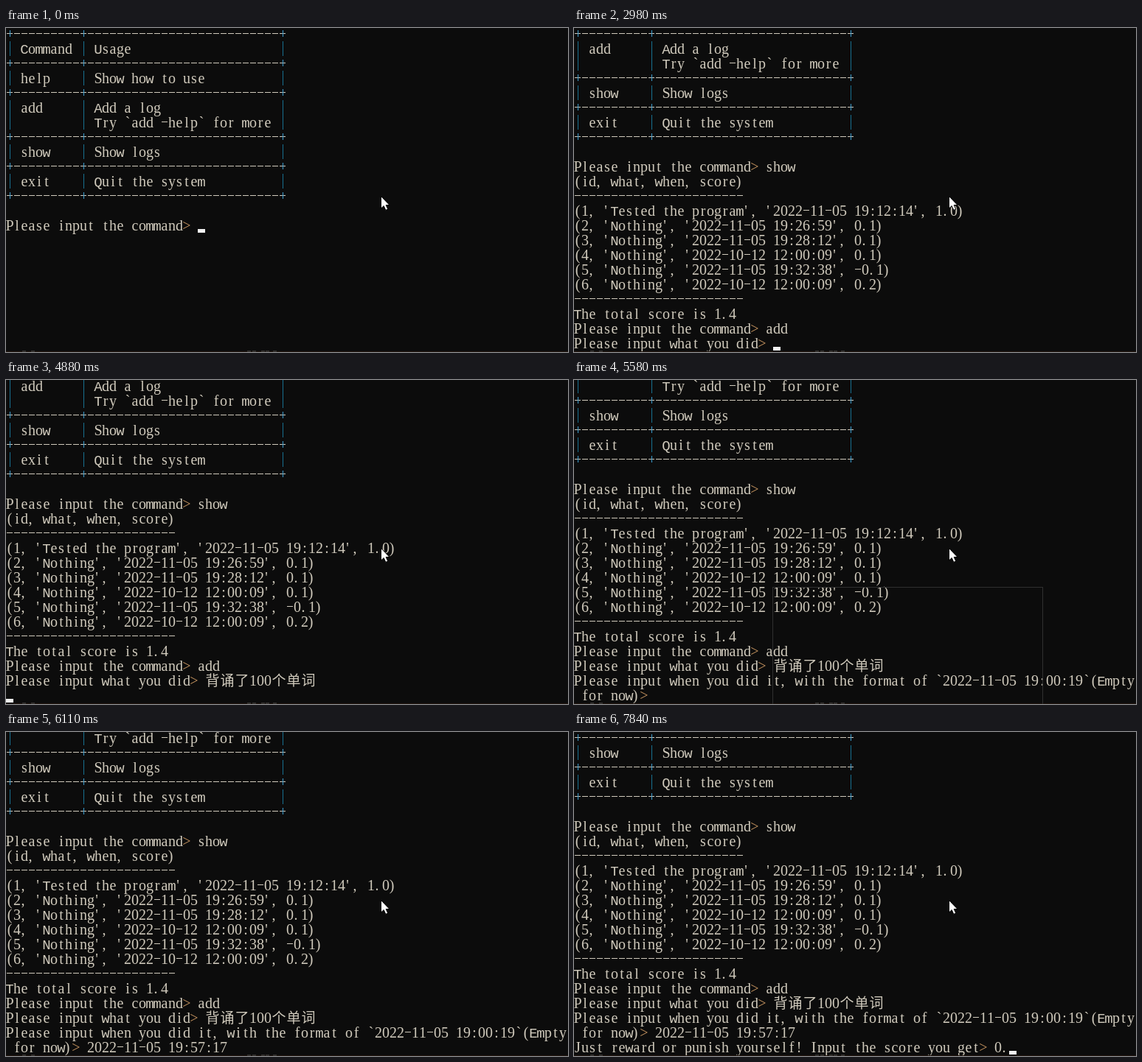
Animation of 762 by 440 pixels, one loop 8000 ms. Source, as an HTML page with a canvas:

```html
<!DOCTYPE html>
<html lang="en">
<head>
<meta charset="utf-8">
<title>Terminal log</title>
<style>
html, body { margin: 0; width: 100%; height: 100%; overflow: hidden; background: #0c0c0c; }
canvas { display: block; }
</style>
</head>
<body>
<canvas id="stage" width="762" height="440"></canvas>
<script>
const ctx = document.getElementById('stage').getContext('2d');
const LOOP = 8000, CELL = 10, ROW = 20, ROWS = 22, TOP = -2;
const INK = '#d0cabc', EDGE = '#17708f', BACK = '#0c0c0c';
const SERIF = '20px "Liberation Serif", serif';
const MONO = '19px "Liberation Mono", monospace';
const CJK = '300 19px "Noto Sans CJK SC", "Noto Sans CJK", sans-serif';

const border = '+' + '-'.repeat(9) + '+' + '-'.repeat(26) + '+\n';
const row = (name, use) => `| ${name.padEnd(8)}| ${use.padEnd(25)}|\n`;
const rule = '-'.repeat(23);
const prompt = 'Please input the command> ';

const banner = border + [
  row('Command', 'Usage'),
  row('help', 'Show how to use'),
  row('add', 'Add a log') + row('', 'Try `add -help` for more'),
  row('show', 'Show logs'),
  row('exit', 'Quit the system')
].join(border) + border + '\n' + prompt;

const listing = `
(id, what, when, score)
${rule}
(1, 'Tested the program', '2022-11-05 19:12:14', 1.0)
(2, 'Nothing', '2022-11-05 19:26:59', 0.1)
(3, 'Nothing', '2022-11-05 19:28:12', 0.1)
(4, 'Nothing', '2022-10-12 12:00:09', 0.1)
(5, 'Nothing', '2022-11-05 19:32:38', -0.1)
(6, 'Nothing', '2022-10-12 12:00:09', 0.2)
${rule}
The total score is 1.4
${prompt}`;

// [time, appended text, caret visible]
const steps = [
  [0, banner, 1],
  [280, 's', 1], [400, '', 0], [550, 'h', 1], [670, 'o', 1], [820, 'w', 1], [970, '', 0],
  [1250, listing, 1], [1970, '', 0],
  [2280, 'a', 1], [2550, 'd', 1], [2670, 'd', 1],
  [2980, '\nPlease input what you did> ', 1], [3510, '', 0], [4040, '', 1],
  [4570, '背诵了100个单词', 0],
  [4880, '\n', 1],
  [5030, 'Please input when you did it, with the format of `2022-11-05 19:00:19`(Empty\n for now)> ', 1],
  [5580, '', 0],
  [6110, '2022-11-05 19:57:17', 0],
  [6670, '\nJust reward or punish yourself! Input the score you get> ', 1],
  [7570, '0', 1], [7720, '.', 0], [7840, '', 1]
];

function rect(x, y, w, h, color) {
  ctx.fillStyle = color;
  ctx.fillRect(x, y, w, h);
}

// Draws one character and returns the width it takes on the grid.
function glyph(ch, x, y) {
  const wide = ch > '\u2fff';
  if (ch === '|') rect(x + 5, y, 1, ROW, EDGE);
  else if (ch === '-' || ch === '+') {
    rect(x + 1, y + 9, 8, 1, INK);
    if (ch === '+') rect(x + 5, y + 5, 1, 9, '#3d9fd0');
  } else if (ch !== ' ') {
    ctx.font = wide ? CJK : SERIF;
    if (!wide && ctx.measureText(ch).width > 11.5) ctx.font = MONO;
    ctx.fillStyle = ch === '>' ? '#c4935f' : INK;
    const shift = "',.)".includes(ch) ? -2 : 0;
    ctx.fillText(ch, x + (wide ? CELL : CELL / 2) + shift, y + 17);
  }
  return wide ? 2 * CELL : CELL;
}

function drawTerminal(t) {
  const done = steps.filter(s => s[0] <= t);
  const lines = done.map(s => s[1]).join('').split('\n').slice(-ROWS);
  let x, y;
  lines.forEach((line, i) => {
    x = 0;
    y = TOP + i * ROW;
    for (const ch of line) x += glyph(ch, x, y);
  });
  if (done.at(-1)[2]) rect(x, y + 15, CELL, 5, '#f2f2f2');
}

function drawPanel(t) {
  if (t < 5580 || t >= 6110) return;
  const open = t >= 5700;
  if (open) rect(269, 281, 367, 159, '#1f1f1f');
  ctx.strokeStyle = open ? '#3c3c3c' : '#303030';
  ctx.lineWidth = 1;
  ctx.strokeRect(269.5, 281.5, 366, 170);
}

function drawBottomEdge() {
  rect(0, 439, 762, 1, '#21160f');
  for (const x of [22, 34, 327, 334, 346, 352, 362]) rect(x, 438, 5, 2, '#33302e');
}

const arrow = new Path2D('M508.5 228.5V245l3.7-3.4 2.6 5.8 3-1.3-2.6-5.6h4.8Z');
function drawPointer() {
  ctx.fillStyle = '#fff';
  ctx.strokeStyle = '#000';
  ctx.lineWidth = 1;
  ctx.fill(arrow);
  ctx.stroke(arrow);
}

function frame() {
  const t = performance.now() % LOOP;
  rect(0, 0, 762, 440, BACK);
  ctx.textAlign = 'center';
  drawTerminal(t);
  drawBottomEdge();
  drawPanel(t);
  drawPointer();
  requestAnimationFrame(frame);
}
frame();
</script>
</body>
</html>
```
